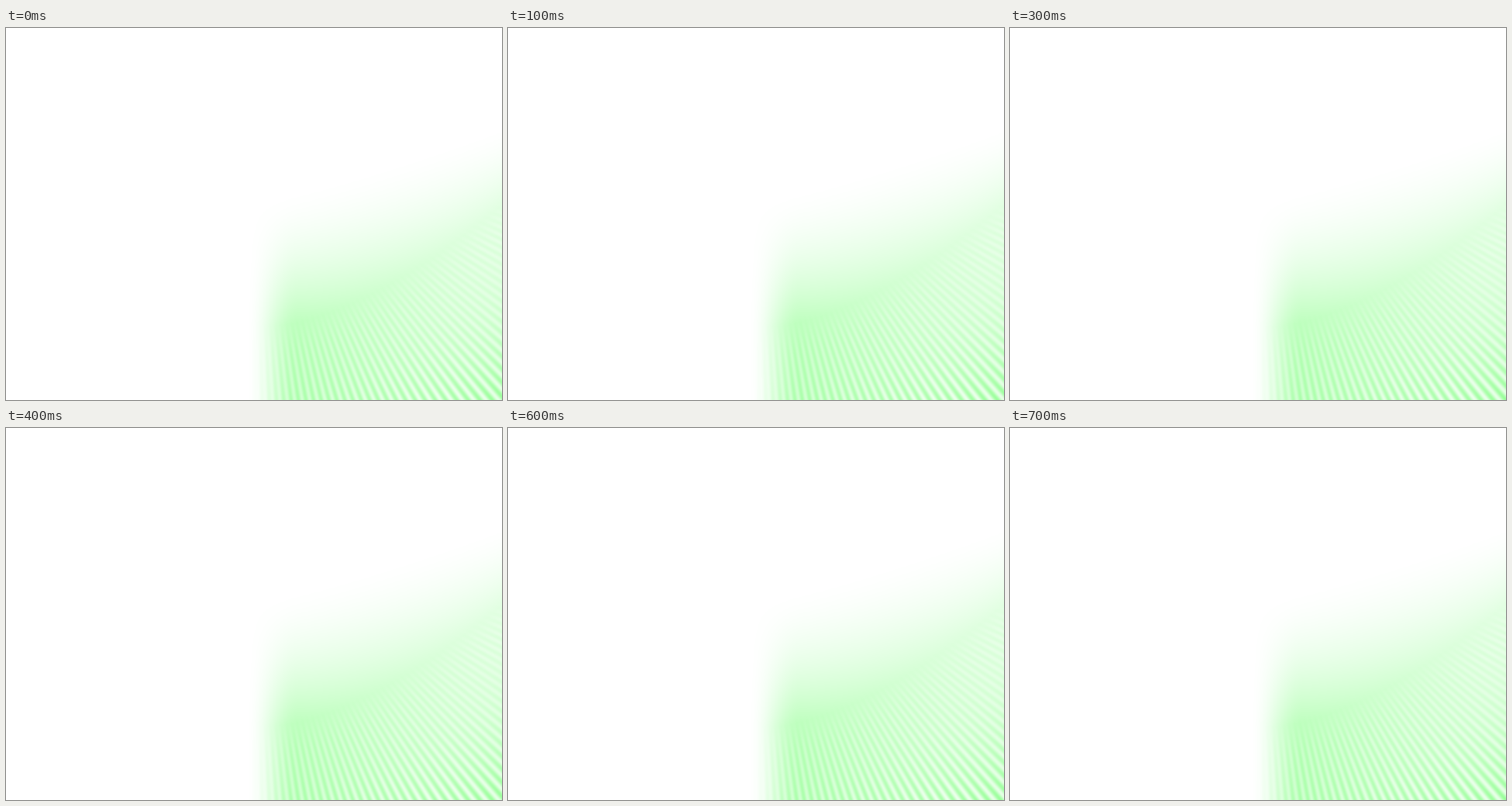
An HTML page with a canvas that plays this animation: 640x480 px, repeating every 0.8 s.

```html
<!DOCTYPE html>
<html lang="en">
<head>
<meta charset="utf-8">
<title>Green rays</title>
<style>
  html, body { margin: 0; width: 100%; height: 100%; overflow: hidden; background: #fff; }
  canvas { display: block; }
</style>
</head>
<body>
<canvas id="stage" width="640" height="480"></canvas>
<script>
const W = 640, H = 480;
const LEFT = 306, TOP = 110;
const CENTER = { x: 320, y: 120 };
const RAYS = 240;
const STEP_MS = 100, STEPS = 4;

const ctx = document.getElementById('stage').getContext('2d');
const w = W - LEFT, h = H - TOP;
const image = ctx.createImageData(w, h);
const glow = new Float32Array(w * h);
const depth = new Float32Array(w * h);
const angle = new Float32Array(w * h);

const clamp = v => Math.min(1, Math.max(0, v));
const smooth = (a, b, v) => {
  const t = clamp((v - a) / (b - a));
  return t * t * (3 - 2 * t);
};

// Soft glow above a curved ridge, rays fanning out below it.
function buildField() {
  for (let x = LEFT; x < W; x++) {
    const u = clamp((x - 340) / 300);
    const ridge = 385 - 158 * Math.pow(u, 1.6);
    const start = 215 - 88 * Math.pow(u, 1.15);
    const crest = 29 + 42 * Math.pow(1 - u, 1.3);
    const side = smooth(310, 377, x);
    for (let y = TOP; y < H; y++) {
      const i = (y - TOP) * w + x - LEFT;
      const below = Math.max(0, y - ridge);
      const rise = Math.pow(clamp((y - start) / (ridge - start)), 1.75 - 0.25 * u);
      const low = clamp((y - 300) / 180);
      glow[i] = side * (crest * rise + 36 * u * (below / 255) ** 2);
      depth[i] = side * smooth(-12, 45, y - ridge) * (6 + 32 * low * low * (0.3 + 0.7 * u));
      angle[i] = Math.atan2(x - CENTER.x, y - CENTER.y);
    }
  }
}

function draw(shift) {
  const px = image.data;
  for (let i = 0; i < glow.length; i++) {
    const wave = Math.cos(RAYS * angle[i] - 2 * Math.PI * shift);
    const tint = 255 - Math.max(0, glow[i] + depth[i] * wave);
    px[4 * i] = px[4 * i + 2] = Math.round(tint);
    px[4 * i + 1] = px[4 * i + 3] = 255;
  }
  ctx.putImageData(image, LEFT, TOP);
}

let shown = -1;
function tick(now) {
  const step = Math.floor(now / STEP_MS) % STEPS;
  if (step !== shown) {
    shown = step;
    draw(step / STEPS);
  }
  requestAnimationFrame(tick);
}

ctx.fillStyle = '#fff';
ctx.fillRect(0, 0, W, H);
buildField();
draw(0);
requestAnimationFrame(tick);
</script>
</body>
</html>
```
